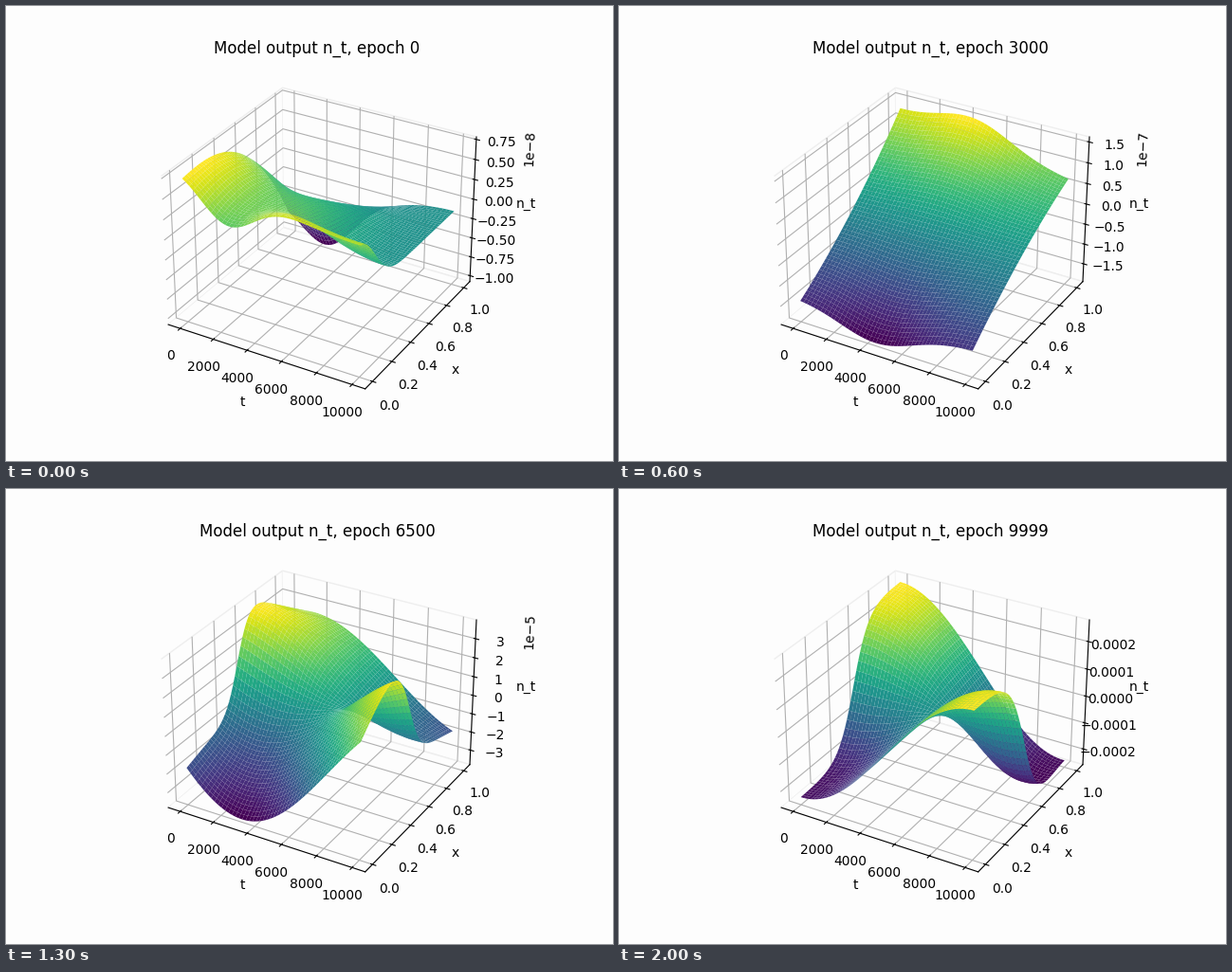
Recreate the animation shown at these times as a matplotlib script. Size 640 by 480 pixels, loop 2.1 s.

```python
import matplotlib.pyplot as plt
import numpy as np
from matplotlib.animation import FuncAnimation

FRAMES = 21
PAPER, EDGE = "#fdfdfd", "#eeeeee"

u = np.linspace(0, 1, 50)
S, X = np.meshgrid(u, u)  # S runs along t, X along x
COS, SIN = np.cos(np.pi * S), np.sin(np.pi * S)


def bump(v, centre, width):
    return np.exp(-((v - centre) / width) ** 2)


def step(v, centre, width):
    return 0.5 + 0.5 * np.tanh((v - centre) / width)


def mix(a, b, w):
    return a + (b - a) * w


def unit(z):
    return (z - z.min()) / (z.max() - z.min())


def wave():
    """Untrained net: high on the left, flat on the right, a dent between."""
    left = 1.02 - 0.8 * X ** 2.5
    right = 0.48 + 0.36 * bump(X, 0, 0.2)
    dent = 0.28 * (1 - 0.55 * np.sin(np.pi * X)) * bump(S, 0.25, 0.22)
    return mix(right, left, (1 + COS) / 2) - dent


def ramp(front, back, bulge, bend):
    """Tilted sheet: heights of its front and back corners, then curvature."""
    z = mix(mix(*front, S), mix(*back, S), X)
    z += bulge * (2 * X - 1) * bump(S, 0.45, 0.3)
    return z - mix(*bend, S) * 4 * X * (1 - X)


def valley():
    """A hump fading along t in front of a steep rise at the back."""
    hump = 0.62 * bump(X, 0.18, 0.42) * (0.1 + 0.9 * (1 - S) ** 1.5)
    rise = 1.05 * np.sin(np.pi / 1.7 * S) ** 1.5
    return hump + rise * step(X, 0.5 + 0.19 * S, 0.16)


def twist():
    swing = 0.45 * np.tanh((X - 0.5) / 0.13) - 0.16 * (2 * X - 1)
    mean = 0.48 + 0.2 * np.sin(np.pi * X)
    return mean + COS * swing + SIN * (0.63 * X - 0.47)


def saddle(droop):
    """Two opposite high corners, two low ones."""
    fall = (1 + COS) / 2
    z = mix(1 - fall, fall, step(X, 0.52, 0.16))
    z -= 0.14 * bump(S, 0.8, 0.25) * bump(X, 0.68, 0.2)
    return z - droop * X ** 8 * (1 - S)


# step, lowest and highest value, shape
KEYS = [
    (0, -1.041e-8, 0.744e-8, wave()),
    (4, -9.32e-8, 7.46e-8,
     ramp((0.09, 0.115), (1.02, 0.75), 0.16, (0.10, -0.08))),
    (8, -3.80e-7, 3.22e-7,
     ramp((0.15, 0.18), (0.96, 0.83), 0.20, (0.04, -0.03))),
    (11, -0.84e-5, 1.49e-5, valley()),
    (13, -3.65e-5, 3.82e-5, twist()),
    (17, -1.78e-4, 2.03e-4, saddle(0.08)),
    (20, -2.49e-4, 2.67e-4, saddle(0)),
]


def surface(i):
    """Blend neighbouring keys; the value range grows exponentially."""
    k = max(j for j in range(len(KEYS) - 1) if KEYS[j][0] <= i)
    (i0, lo0, hi0, a), (i1, lo1, hi1, b) = KEYS[k:k + 2]
    w = (i - i0) / (i1 - i0)
    lo = lo0 * (lo1 / lo0) ** w
    hi = hi0 * (hi1 / hi0) ** w
    return mix(lo, hi, unit(mix(unit(a), unit(b), w)))


fig = plt.figure(figsize=(6.4, 4.8), dpi=100, facecolor=PAPER)
ax = fig.add_subplot(projection="3d")


def draw(i):
    ax.clear()
    ax.set_facecolor(PAPER)
    ax.margins(x=0.05, y=0.05, z=0)
    for axis in (ax.xaxis, ax.yaxis, ax.zaxis):
        axis.set_pane_color(PAPER)
        axis.pane.set_edgecolor(EDGE)
    ax.plot_surface(S * 10000, X, surface(i), cmap="viridis")
    ax.set_xlabel("t")
    ax.set_ylabel("x")
    ax.set_zlabel("n_t")
    ax.set_title(f"Model output n_t, epoch {min(500 * i, 9999)}")
    return []


anim = FuncAnimation(fig, draw, frames=FRAMES, init_func=lambda: [],
                     interval=100, repeat=True, repeat_delay=0)
plt.show()
```
